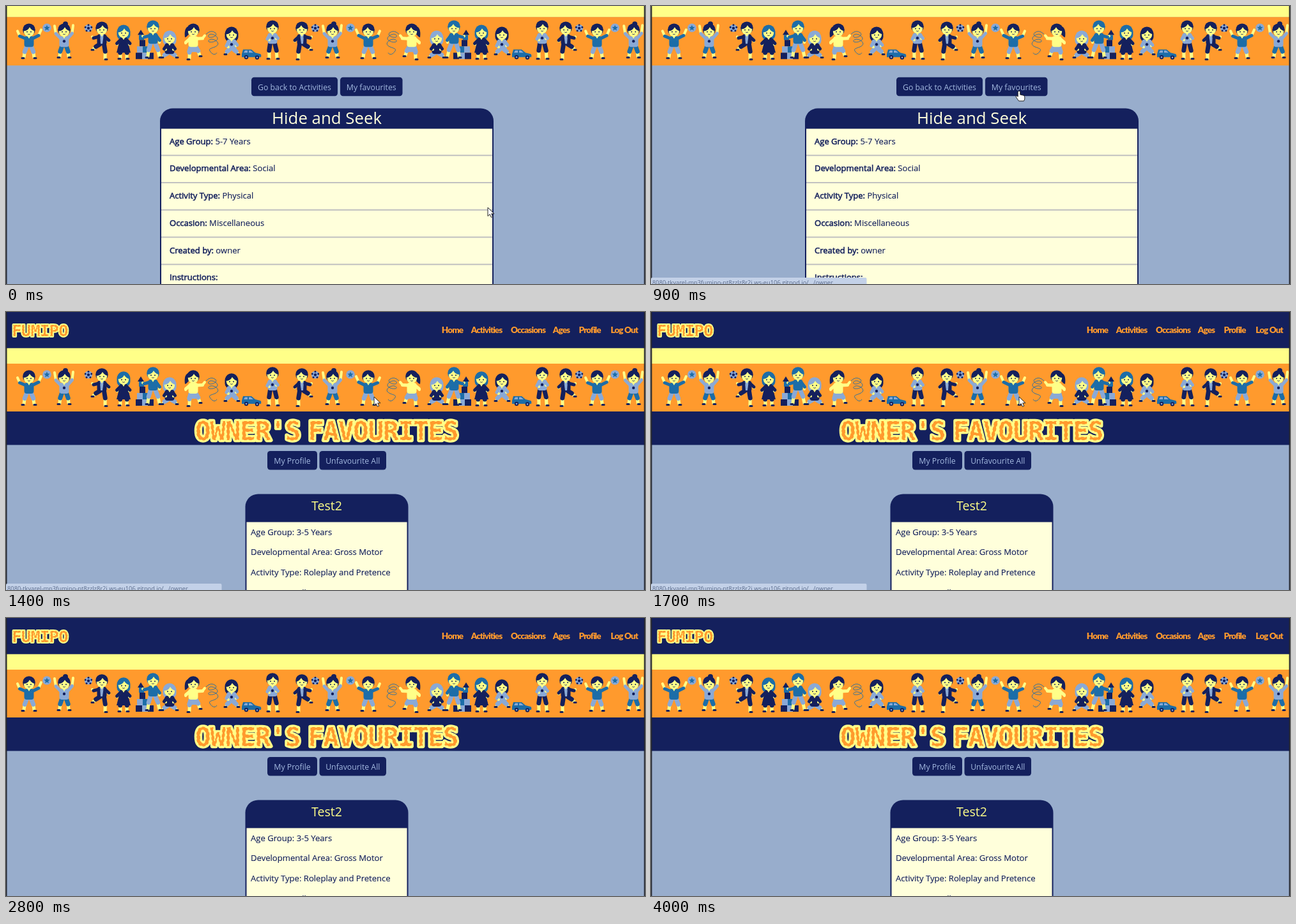
An HTML page for the animation above (4200 ms loop, 1000 px wide and 436 px high).

```html
<!DOCTYPE html>
<html lang="en">
<head>
<meta charset="utf-8">
<style>
  html, body { margin: 0; width: 100%; height: 100%; overflow: hidden; }
  svg { display: block; width: 1000px; height: 436px; font-family: "Open Sans", "Noto Sans", sans-serif; }
  .fun { font: bold 41px "DejaVu Sans Mono", monospace; letter-spacing: -.03em; text-anchor: middle; }
  .nav { font: 900 13.5px Lato, sans-serif; letter-spacing: -.9px; text-anchor: middle; }
</style>
</head>
<body>
<svg id="stage" viewBox="0 0 1000 436"></svg>
<script>
const navy = '#14205d', teal = '#1c6da8', light = '#8aa9d6', sky = '#98adcc';
const sun = '#ffff88', cream = '#ffffdb', orange = '#ff9a2d';

const rect = (x, y, w, h, fill, r = 0) =>
  `<rect x="${x}" y="${y}" width="${w}" height="${h}" rx="${r}" fill="${fill}"/>`;
const dot = (x, y, r, fill) => `<circle cx="${x}" cy="${y}" r="${r}" fill="${fill}"/>`;
const path = (d, fill, more = '') => `<path d="${d}" fill="${fill}" ${more}/>`;
const limb = (points, color, w) =>
  `<polyline points="${points}" fill="none" stroke="${color}" stroke-width="${w}" stroke-linecap="round" stroke-linejoin="round"/>`;
const text = (x, y, s, size, fill, more = '') =>
  `<text x="${x}" y="${y}" font-size="${size}" fill="${fill}" ${more}>${s}</text>`;
const middle = 'text-anchor="middle"';
const mid = (a, b, k) => a + (b - a) * k;

// Toys, in the coordinates of the child who holds them
const starBall = dot(28, 17, 6.8, light) +
  path('M28 12.5l1.3 3 3.3.3-2.5 2.1.8 3.4-2.9-1.8-2.9 1.8.8-3.4-2.5-2.1 3.3-.3z', teal);
const football = dot(-21, 17.5, 6, light) + dot(-21, 17.5, 2.2, navy) +
  [0, 1, 2, 3, 4].map(i => dot(-21 + 5 * Math.sin(i * 1.257), 17.5 - 5 * Math.cos(i * 1.257), 1.5, navy)).join('');
const coil = path('M20 27q8-8 15-2c5 6-14 10-11 4s18 2 13 7-17 4-12 0 17 3 13 8-15 4-12 9 8 8 11 3',
  'none', `stroke="${teal}" stroke-width=".9"`);
const blocks = path('M-24 28l5-8 5 8z', navy) + rect(-22, 28, 8, 8, teal) + rect(-21, 36, 9, 10, navy) +
  rect(-25, 46, 9, 10, light) + rect(-16, 46, 9, 10, teal) + rect(-27, 56, 10, 10, navy) +
  rect(-17, 56, 9, 10, light) + rect(-8, 56, 9, 10, navy);

const poses = {
  spread: { y: 21, top: teal, low: light, arms: [-18, 22, 19, 20], feet: [-8, 63, 8, 63], toy: starBall },
  cheer: { y: 21, top: light, low: teal, arms: [-15, 14, 14, 13], feet: [-7, 62, 7, 62], style: 'bun' },
  kick: { y: 18, top: navy, low: navy, arms: [-15, 31, 11, 38], feet: [-13, 50, 5, 65], toy: football, tie: 1 },
  dress: { y: 23, top: navy, low: navy, hair: teal, arms: [-10, 43, 9, 43], feet: [-5, 64, 5, 64], style: 'long' },
  build: { y: 16, top: teal, low: light, hair: teal, arms: [-16, 30, 10, 40], feet: [-8, 62, 10, 62], toy: blocks },
  sit: { y: 32, top: navy, low: light, hair: light, arms: [-6, 51, 6, 51], feet: [-10, 62, 10, 62], style: 'long' },
  rope: { y: 21, top: sun, low: light, arms: [-12, 41, 18, 29], feet: [-6, 65, 10, 60], style: 'tail', toy: coil },
  kneel: { y: 26, top: light, low: light, arms: [-5, 47, 7, 45], feet: [-8, 57, 9, 57], style: 'long' },
  stand: { y: 16, top: light, low: navy, arms: [-5, 36, 6, 34], feet: [-5, 64, 7, 64] }
};

function kid(name, x, flip) {
  const { y, top, low, hair = navy, arms, feet, style, tie, toy = '' } = poses[name];
  const hip = y + 25, neck = y + 13;
  let s = toy;
  if (style === 'long') s += rect(-10.5, y - 8, 21, 21, hair, 8);
  if (style === 'bun') s += dot(2, y - 10, 4, hair);
  if (style === 'tail') s += path(`M-6 ${y - 7}q-9 2-7 18 6-2 9-12z`, hair);
  for (const i of [0, 1]) {
    const side = i * 2 - 1, fx = feet[i * 2], fy = feet[i * 2 + 1];
    const kx = mid(side * 3.5, fx, .5) + side, ky = mid(hip, fy, .5);
    s += limb([side * 3.5, hip, kx, ky, fx, fy], sun, 5);
    s += limb([side * 3.5, hip, kx, ky], low, 7);
    s += limb([fx, fy + 1.5, fx + side * 3, fy + 1.5], navy, 3);
  }
  if (style === 'tail') s += path(`M-6 ${hip - 4}h12l4 13h-20z`, low);
  s += name === 'dress'
    ? path(`M-5 ${y + 9}h10l6 24h-22z`, top)
    : rect(-7.5, y + 9, 15, 17, top, 4);
  if (tie) s += path(`M-3 ${y + 9}h6l-2 15h-3z`, light);
  else if (top === light) s += dot(0, y + 17, 2.2, navy);
  for (const i of [0, 1]) {
    const side = i * 2 - 1, hx = arms[i * 2], hy = arms[i * 2 + 1];
    const ex = mid(side * 5, hx, .5) + side * 3, ey = mid(neck, hy, .5) + 2;
    s += limb([side * 5, neck, ex, ey, hx, hy], sun, 4);
    s += limb([side * 5, neck, ex, ey], top, 5);
  }
  s += path(`M-3 ${y + 8}h6l-3 5z`, sun) + dot(0, y - 1, 9.8, hair) + dot(0, y + 1.6, 8.2, sun);
  s += path(`M-9 ${y + 1}q0-11 9-11t9 11q-5-1-8-6-3 6-10 6z`, hair);
  s += dot(-3, y + 2.2, 1, navy) + dot(3, y + 2.2, 1, navy);
  s += path(`M-2 ${y + 5.5}q2 2 4 0`, 'none', `stroke="${navy}" stroke-width=".8"`);
  return `<g transform="translate(${x} 0) scale(${flip ? -1 : 1} 1)">${s}</g>`;
}

const car = x => `<g transform="translate(${x} 0)">` +
  path('M-15 58l2-7h13l6 5 8 2q2 1 1 5h-30z', teal) + path('M-10 52.5h4v3.5h-6zM-4 52.5h3l4 3.5h-7z', light) +
  dot(-8, 63, 3.2, navy) + dot(9, 63.5, 3.2, navy) + dot(-8, 63, 1.3, light) + dot(9, 63.5, 1.3, light) + '</g>';

const row = [
  ['spread', 36], ['cheer', 91], ['kick', 150], ['dress', 184], ['build', 230], ['sit', 256],
  ['rope', 293], ['kneel', 353], ['stand', 417], ['kick', 463, 1], ['cheer', 511], ['spread', 567, 1],
  ['rope', 635, 1], ['build', 701, 1], ['sit', 674], ['dress', 744], ['kneel', 776], ['stand', 839],
  ['kick', 876, 1], ['spread', 925], ['cheer', 982]
];
const banner = y => `<g transform="translate(0 ${y})">` + rect(0, 0, 1000, 76, orange) +
  row.map(k => kid(...k)).join('') + car(384) + car(807) + '</g>';

const button = (x, y, w, label) =>
  rect(x, y, w, 29.5, navy, 4.5) + text(x + w / 2, y + 20, label, 12.3, '#a3b9e0', middle);
const edges = rect(0, 0, 1.5, 436, '#23252c') + rect(998.5, 0, 1.5, 436, '#23252c');

function card(x, y, w, head, title, size, base, color) {
  const r = 20;
  return path(`M${x} 440V${y + r}a${r} ${r} 0 0 1 ${r}-${r}h${w - 2 * r}a${r} ${r} 0 0 1 ${r} ${r}V440z`, navy) +
    rect(x + 2, head, w - 4, 250, cream) + text(x + w / 2, base, title, size, color, middle);
}

const inked = `stroke="${navy}" stroke-width=".15"`;
const facts = [['Age Group:', '5-7 Years'], ['Developmental Area:', 'Social'], ['Activity Type:', 'Physical'],
  ['Occasion:', 'Miscellaneous'], ['Created by:', 'owner'], ['Instructions:', '']];
const activity = rect(0, 0, 1000, 436, sky) + rect(0, 0, 1000, 17.5, sun) + banner(17.3) +
  button(384, 111.7, 135, 'Go back to Activities') + button(523, 111.7, 97.5, 'My favourites') +
  card(241, 160.5, 522, 192.5, 'Hide and Seek', 25.8, 185, cream) +
  facts.map(([label, value], i) => {
    const y = 216.7 + i * 42.75;
    return text(256, y, `<tspan stroke-width=".55">${label}</tspan> ${value}`, 13.05, navy, inked) +
      rect(243, y + 16.6, 518, 2, '#c0c0c0');
  }).join('') + edges;

// Orange letters with a yellow rim and stitches
function fun(x, y, s, size) {
  const at = `class="fun" x="${x}" y="${y}" style="font-size:${size}px" stroke="${sun}"`;
  return `<text ${at} fill="${orange}" stroke-width="${size / 6.5}" stroke-linejoin="round" paint-order="stroke">${s}</text>` +
    `<text ${at} fill="none" stroke-width="${size / 26}" stroke-dasharray="${size / 12} ${size / 9}">${s}</text>`;
}

const menu = [['Home', 698.5], ['Activities', 752], ['Occasions', 817], ['Ages', 869], ['Profile', 913.5], ['Log Out', 967.5]];
const lines = ['Age Group: 3-5 Years', 'Developmental Area: Gross Motor',
  'Activity Type: Roleplay and Pretence', 'Occasion: Null'];
const favourites = rect(0, 0, 1000, 436, sky) + rect(0, 0, 1000, 57, navy) + rect(0, 56.7, 1000, 25, sun) +
  banner(81) + rect(0, 156, 1000, 52.5, navy) + fun(53, 38, 'FUMIPO', 25.5) +
  menu.map(([s, x]) => `<text class="nav" x="${x}" y="32.5" fill="${orange}">${s}</text>`).join('') +
  fun(378, 200.5, 'OWNER\'S', 41) + fun(590, 200.5, 'FAVOURITES', 41) +
  button(409, 218, 78, 'My Profile') + button(490.5, 218, 104.5, 'Unfavourite All') +
  card(374.5, 285.5, 255, 329.5, 'Test2', 19.6, 311, sun) +
  lines.map((s, i) => text(383, 349.5 + i * 31.7, s, 13.1, navy, inked)).join('') + edges;

const status = rect(0, 426, 337.5, 12, '#c3d1e8', 2) +
  text(2, 437.3, '8080-tkvarel-mp3fumipo-pt8zzlz8r2j.ws-eu106.gitpod.io/…/owner', 9.3, '#5a6b8c');
const outline = 'stroke="#222" stroke-width="1" stroke-linejoin="round"';
const arrow = path('M0 0V13.5L3.2 10.6 5.3 15.4 7.7 14.4 5.7 9.8H10Z', '#fff', outline);
const hand = path('M-1.8 1.5q1.8-3 3.6 0V6l5 1.2q2 .5 2 2.6v2.4q0 2-1.4 3.8H-.4L-4.6 10q-1-2 .8-2.2l2 1.4z', '#fff', outline);

const layer = (id, content) => `<g id="${id}">${content}</g>`;
const el = id => document.getElementById(id);
const show = (id, on) => el(id).style.display = on ? '' : 'none';
el('stage').innerHTML = layer('first', activity) + layer('second', favourites) + layer('bar', status) +
  layer('arrowCursor', arrow) + layer('handCursor', hand);

// time, x, y of the pointer
const track = [[0, 754, 316], [600, 585, 139], [900, 576, 133], [1800, 576, 133], [2000, 543, 90], [2200, 496, 12], [4200, 496, 12]];
function pointer(t) {
  const i = track.findIndex((p, n) => n && t < p[0]);
  const [t0, x0, y0] = track[i - 1], [t1, x1, y1] = track[i];
  const k = (t - t0) / (t1 - t0), e = i === 1 ? k * k * (3 - 2 * k) : k;
  return [mid(x0, x1, e), mid(y0, y1, e)];
}

const start = performance.now();
function draw(now) {
  const t = Math.floor(Math.max(0, now - start) % 4200 / 100) * 100;
  const [x, y] = pointer(t), link = t >= 600 && t < 1300;
  show('first', t < 1400);
  show('second', t >= 1400);
  show('bar', t >= 800 && t < 1800);
  show('handCursor', link);
  show('arrowCursor', !link && t < 2300);
  for (const id of ['handCursor', 'arrowCursor']) el(id).setAttribute('transform', `translate(${x} ${y})`);
  requestAnimationFrame(draw);
}
draw(start);
</script>
</body>
</html>
```
